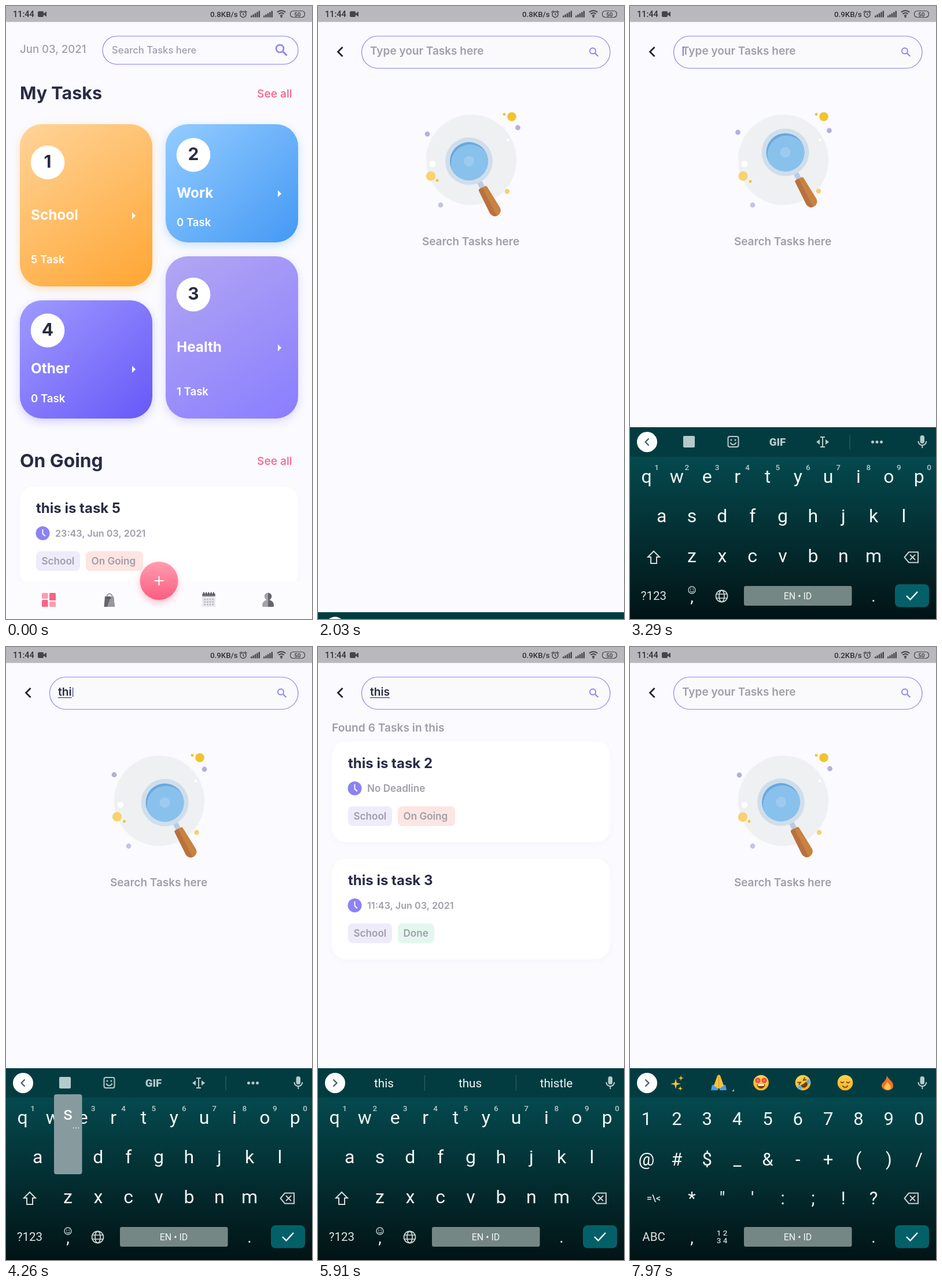
Animation, 529 px wide and 1058 px high, one loop 8000 ms. Source, as an HTML page with a canvas:

```html
<!DOCTYPE html>
<html lang="en">
<head>
<meta charset="utf-8">
<title>Task search</title>
<style>
html, body { margin: 0; width: 100%; height: 100%; overflow: hidden; background: #fafaff; }
canvas { display: block; width: 529px; height: 1058px; }
</style>
</head>
<body>
<canvas id="stage"></canvas>
<script>
const W = 529, H = 1058, LOOP = 8000;
const BG = '#fafaff', INK = '#292b45', GREY = '#9f9eaa', PINK = '#fa6385', VIOLET = '#8c82f5';
const dpr = window.devicePixelRatio || 1;

function context(canvas) {
  canvas.width = W * dpr;
  canvas.height = H * dpr;
  const ctx = canvas.getContext('2d');
  ctx.scale(dpr, dpr);
  return ctx;
}
const stage = context(document.getElementById('stage'));
const layer = context(document.createElement('canvas'));
let c = stage; // current drawing surface

const clamp = v => Math.max(0, Math.min(1, v));
const lerp = (a, b, p) => a + (b - a) * p;
const phase = (t, start, len) => clamp((t - start) / len);

function bezier(x1, y1, x2, y2) {
  const at = (a, b, u) => 3 * a * u * (1 - u) ** 2 + 3 * b * u * u * (1 - u) + u ** 3;
  return x => {
    if (x <= 0 || x >= 1) return clamp(x);
    let lo = 0, hi = 1;
    for (let i = 0; i < 24; i++) {
      const m = (lo + hi) / 2;
      if (at(x1, x2, m) < x) lo = m; else hi = m;
    }
    return at(y1, y2, (lo + hi) / 2);
  };
}
const easeSlide = bezier(.4, 0, .2, 1), easeIn = bezier(.42, 0, 1, 1), easeOut = bezier(0, 0, .58, 1);

function text(s, x, y, size, color, weight = 600, align = 'left', family = 'Inter') {
  c.font = `${weight} ${size}px ${family}, sans-serif`;
  c.textAlign = align;
  c.fillStyle = color;
  c.fillText(s, x, y);
}
const roboto = (s, x, y, size, color = '#f2f7f7', weight = 400, align = 'center') =>
  text(s, x, y, size, color, weight, align, 'Roboto');

function box(x, y, w, h, r, fill) {
  c.beginPath();
  c.roundRect(x, y, w, h, r);
  if (fill) { c.fillStyle = fill; c.fill(); }
}
function disc(x, y, r, fill) {
  c.beginPath();
  c.arc(x, y, r, 0, 7);
  c.fillStyle = fill;
  c.fill();
}
function ring(x, y, r, color, width, from = 0, to = Math.PI * 2) {
  c.beginPath();
  c.arc(x, y, r, from, to);
  c.strokeStyle = color;
  c.lineWidth = width;
  c.stroke();
}
function trace(pts) {
  c.beginPath();
  for (let i = 0; i < pts.length; i += 2) c.lineTo(pts[i], pts[i + 1]);
}
function line(color, width, ...pts) {
  trace(pts);
  c.strokeStyle = color;
  c.lineWidth = width;
  c.stroke();
}
function poly(fill, ...pts) {
  trace(pts);
  c.closePath();
  c.fillStyle = fill;
  c.fill();
}
function gradient(x0, y0, x1, y1, a, b) {
  const g = c.createLinearGradient(x0, y0, x1, y1);
  g.addColorStop(0, a);
  g.addColorStop(1, b);
  return g;
}
function shadow(color, blur, dy) {
  c.shadowColor = color;
  c.shadowBlur = blur * dpr;
  c.shadowOffsetY = dy * dpr;
}
const noShadow = () => shadow('transparent', 0, 0);

// ---------- status bar ----------
function statusBar(t) {
  const ink = '#45444a';
  box(0, 0, W, 27.5, 0, '#b9b8bd');
  roboto('11:44', 12, 19, 14.5, '#303036', 500, 'left');
  box(55, 9, 10, 10, 2, ink);
  poly(ink, 65, 13, 70, 9.5, 70, 18.5, 65, 15);
  const rate = t < 2590 ? '0.8' : t < 6860 ? '0.9' : '0.2';
  roboto(rate + 'KB/s', 353, 19, 13.3, '#303036', 500, 'left');
  ring(410, 14.5, 5, ink, 1.4);
  line(ink, 1.3, 410, 11.5, 410, 15, 412, 16);
  line(ink, 1.5, 403.5, 11, 407, 8);
  line(ink, 1.5, 413, 8, 416.5, 11);
  for (const x of [423, 445])
    for (let i = 0; i < 5; i++) box(x + i * 3.4, 16.5 - i * 2, 2.4, 3 + i * 2, 0, ink);
  for (const r of [4, 8, 12]) ring(476, 19, r - 1, ink, 1.8, -2.3, -.84);
  disc(476, 18.5, 1.6, ink);
  box(491.5, 8.5, 25, 11, 5);
  c.strokeStyle = ink;
  c.lineWidth = 1.2;
  c.stroke();
  roboto('50', 504, 17.8, 9.5, '#303036', 500);
}

// ---------- home page ----------
function tile(x, y, h, a, b, n, name, count, cy, nameY, countY) {
  shadow(b + '48', 15, 5);
  box(x, y, 229, h, 38, gradient(x + 20, y, x + 209, y + h, a, b));
  noShadow();
  disc(x + 48, cy, 29.3, '#fff');
  text(n, x + 48, cy + 9, 30, INK, 700, 'center');
  text(name, x + 19, nameY, 24.3, '#fff', 700);
  text(count + ' Task', x + 19, countY, 18.6, '#fff');
  poly('#fff', x + 194, nameY - 13, x + 200, nameY - 7, x + 194, nameY - 1);
}

function chip(label, x, y, w, fill) {
  box(x, y, w, 34, 8, fill);
  text(label, x + 9.5, y + 23, 17.1, GREY);
}

function taskCard(y, title, due, done) {
  shadow('rgba(150,150,200,.06)', 10, 3);
  box(24, y, 481, 174, 24, '#fff');
  noShadow();
  text(title, 52, y + 46, 24, INK, 700);
  disc(63.5, y + 81, 12, VIOLET);
  line('#fff', 1.8, 63.5, y + 74, 63.5, y + 82, 68, y + 86);
  text(due, 85, y + 87, due[0] === 'N' ? 17.1 : 16.2, GREY);
  chip('School', 52, y + 112, 76, '#eeebfb');
  if (done) chip('Done', 138, y + 112, 63, '#e4f7ef');
  else chip('On Going', 138, y + 112, 99, '#fde5e2');
}

function navBar() {
  box(0, 992, W, 66, 0, '#fcfcff');
  box(62, 1013, 10.5, 10, 1.5, '#fc9cb0');
  box(62, 1025, 10.5, 12, 1.5, PINK);
  box(75, 1013, 11, 13, 1.5, PINK);
  box(75, 1028, 11, 9, 1.5, '#fc9cb0');
  ring(179, 1019, 4.5, '#77777d', 1.5, Math.PI, 0);
  poly('#65656b', 171, 1019, 186, 1019, 188, 1037, 169.5, 1037);
  poly('#98989e', 181, 1019, 186, 1019, 188, 1037, 175, 1037);
  line('#44444a', 1.2, 174, 1022, 182, 1022);
  box(339, 1014, 23, 23, 2, '#e8e8ec');
  box(339, 1014, 23, 5, 2, '#77777d');
  for (let i = 0; i < 5; i++) box(341 + i * 4.2, 1011.5, 2, 5, 1, '#4b4b51');
  for (let i = 0; i < 12; i++)
    box(342.5 + i % 4 * 4.6, 1023 + Math.floor(i / 4) * 4.4, 2.6, 2.4, 0, '#b5b5bb');
  for (const [side, fill] of [[0, '#a3a3a9'], [1, '#65656b']]) {
    c.save();
    c.beginPath();
    c.rect(side ? 453 : 440, 1010, 13, 30);
    c.clip();
    box(443, 1025, 20, 12, [9, 9, 2, 2], fill);
    disc(453, 1019, 6.3, fill);
    c.restore();
  }
  shadow('rgba(252,98,130,.4)', 12, 5);
  disc(264.5, 992, 33, gradient(264, 962, 264, 1025, '#ff9bae', '#fb5c80'));
  noShadow();
  line('#fff', 2, 256.5, 992, 272.5, 992);
  line('#fff', 2, 264.5, 984, 264.5, 1000);
}

function home() {
  text('Jun 03, 2021', 24, 81, 18.6, GREY, 500);
  text('My Tasks', 24, 161, 30.5, INK, 700);
  text('See all', 434, 158, 19.2, PINK, 500);
  tile(24, 204, 280, '#ffd295', '#ffa736', '1', 'School', 5, 270, 369, 444);
  tile(276, 204, 204, '#91caff', '#479bf5', '2', 'Work', 0, 257, 331, 380);
  tile(276, 432, 280, '#b1a5f3', '#8b7fff', '3', 'Health', 1, 498, 597, 672);
  tile(24, 508, 204, '#9d97ff', '#695bf8', '4', 'Other', 0, 560, 634, 684);
  text('On Going', 24, 796, 31.8, INK, 700);
  text('See all', 434, 792, 19.2, PINK, 500);
  taskCard(829, 'this is task 5', '23:43, Jun 03, 2021');
  navBar();
}

// ---------- search field ----------
function searchField(p, t, typed) {
  const x = lerp(167, 75.5, p), h = lerp(48.5, 55.5, p);
  box(x, 52, 505 - x, h, h / 2, p ? '#fafafc' : BG);
  c.strokeStyle = VIOLET;
  c.lineWidth = 1.2;
  c.stroke();
  const mx = lerp(473.5, 475, p), my = lerp(73.5, 77.5, p), r = lerp(6.5, 5, p);
  ring(mx, my, r, VIOLET, lerp(2.6, 1.9, p));
  line(VIOLET, lerp(3, 2.2, p), mx + r * .7, my + r * .7, mx + r * 1.85, my + r * 1.85);
  if (!p) return text('Search Tasks here', 183, 82, 16.6, GREY, 500);

  const tx = x + 14.5;
  if (typed.s) {
    text(typed.s, tx, 84, 19.2, INK);
    const w = c.measureText(typed.s).width;
    line(INK, 1, tx, 87.5, tx + w, 87.5);
    drawCaret(t, tx + w + 1, typed.at);
  } else {
    text('Type your Tasks here', tx, 84, 19, p < 1 ? '#8b8992' : GREY);
    drawCaret(t, tx + .8, typed.at);
  }
}
function drawCaret(t, x, since) {
  if (t >= 2100 && Math.floor((t - since) / 500) % 2 === 0) box(x, 70, 2, 16, 0, '#7d78c4');
}

// ---------- magnifier scene ----------
const KEYS = [0, 70, 1330, 2300];
function along(vals, s) {
  for (let i = 1; i < 4; i++)
    if (s < KEYS[i]) return lerp(vals[i - 1], vals[i], (s - KEYS[i - 1]) / (KEYS[i] - KEYS[i - 1]));
  return vals[3];
}
const DOTS = [
  [[188, 189, 186.5, 187], [221, 221, 218, 220.5], 4.4, '#b3b0da'],
  [[345.5, 345.5, 344.5, 343], [210, 210, 215, 211], 4.4, '#b3b0da'],
  [[194, 195, 195.5, 192], [293.5, 293.5, 293.5, 293], 8.2, '#f7d370'],
  [[205.5, 206, 208, 204.5], [301, 301, 303, 301], 2.4, '#efc231'],
  [[328, 327, 326, 329.5], [320, 320, 319.5, 320], 4.2, '#f6cf70']
];

function handle() {
  box(38, -4.5, 16, 9, 0, '#bccbe4');
  c.beginPath();
  c.moveTo(54, -8);
  c.lineTo(96, -11.5);
  c.arc(96, -1.5, 10, -Math.PI / 2, Math.PI / 2);
  c.lineTo(54, 8);
  c.quadraticCurveTo(51, 8, 51, 5);
  c.lineTo(51, -5);
  c.quadraticCurveTo(51, -8, 54, -8);
  c.fillStyle = '#c9823f';
  c.fill();
  c.clip();
  box(50, 0, 60, 12, 0, '#b8713f');
}

function scene(s) {
  disc(265, 265.5, 78, '#eff0f2');
  disc(335, 191, 7.8, '#efc430');
  disc(322, 187, 2.4, '#efc430');
  disc(328, 231.5, 2.4, '#fff');
  disc(198, 272.5, 5.5, '#fff');
  disc(212, 343.5, 4.4, '#c3c4e5');
  for (const [xs, ys, r, fill] of DOTS) disc(along(xs, s), along(ys, s), r, fill);

  const a = (133 + .0876 * s + 1.335e-5 * s * s) * Math.PI / 180;
  c.save();
  c.translate(268 + 9.3 * Math.cos(a), 261.8 + 9.3 * Math.sin(a));
  c.save();
  c.rotate(63 * Math.PI / 180);
  handle();
  c.restore();
  disc(0, 0, 41, '#cfdeeb');
  disc(0, 0, 33, '#68a8de');
  c.clip();
  disc(2, 4, 33, '#89c1ed');
  disc(0, 0, 9, '#9dcbf0');
  c.restore();
  text('Search Tasks here', 264, 412.5, 18.9, GREY, 600, 'center');
}

const FOUND = [
  ['this is task 2', 'No Deadline'],
  ['this is task 3', '11:43, Jun 03, 2021', true],
  ['this is task 4', 'No Deadline']
];
function results(t, word) {
  text('Found 6 Tasks in ' + word, 24, 146, 19.2, GREY);
  FOUND.forEach((item, i) => {
    const p = easeOut(phase(t, 5250 + i * 350, 260));
    if (!p) return;
    c.globalAlpha = p;
    taskCard(163 + i * 202 - 17 * (1 - p), ...item);
    c.globalAlpha = 1;
  });
}

// ---------- keyboard ----------
const keyX = i => 28.5 + i * 52.35;
const ROWS = [['qwertyuiop', 0, 814], ['asdfghjkl', .5, 882], ['zxcvbnm', 1.5, 951]];
const SYMBOLS = [['1234567890', 0, 825], ['@#$_&-+()/', 0, 895], ['*"\':;!?', 1.5, 962]];
const PRESSES = [['t', 3430, 3530], ['h', 3720, 3820], ['i', 4000, 4100], ['s', 4220, 4330]];
const DELETES = [6910, 7040, 7170, 7310];

function typedAt(t) {
  let s = '', at = 2100;
  for (const [key, , up] of PRESSES) if (t >= up) { s += key; at = up; }
  for (const d of DELETES) if (t >= d) { s = s.slice(0, -1); at = d; }
  return { s, at };
}

function chevron(open) {
  disc(29.5, 752.5, 17.5, '#fff');
  const d = open ? 3 : -3;
  line('#3b5557', 2, 29.5 - d, 746.5, 29.5 + d, 752.5, 29.5 - d, 758.5);
}

function toolbar() {
  const ink = '#b5cacb';
  box(92, 742, 20, 20, 2, ink);
  box(169.5, 743, 18, 18, 3);
  c.strokeStyle = ink;
  c.lineWidth = 2;
  c.stroke();
  disc(175, 749, 1.5, ink);
  disc(182, 749, 1.5, ink);
  ring(178.5, 752, 5, ink, 2, .2, 2.9);
  roboto('GIF', 255, 759, 18.5, ink, 900);
  line(ink, 2, 333, 744, 333, 761);
  line(ink, 2, 329, 744, 337, 744);
  line(ink, 2, 329, 761, 337, 761);
  poly(ink, 322, 752.5, 328, 748, 328, 757);
  poly(ink, 344, 752.5, 338, 748, 338, 757);
  line('#2c6064', 1.2, 380, 740, 380, 765);
  for (const x of [419.5, 427, 434.5]) disc(x, 752.5, 2.5, ink);
}

function sparkle(x, y, r) {
  const pts = [];
  for (let i = 0; i < 8; i++) {
    const q = i % 2 ? r * .28 : r, a = i * Math.PI / 4;
    pts.push(x + q * Math.cos(a), y + q * Math.sin(a));
  }
  poly('#fcc63b', ...pts);
}
function flame(x, y, k, fill) {
  c.beginPath();
  c.moveTo(x - k * .1, y - k * 1.25);
  c.bezierCurveTo(x + k * .3, y - k * .5, x + k, y - k * .4, x + k * .85, y + k * .5);
  c.bezierCurveTo(x + k * .6, y + k * 1.15, x - k * .6, y + k * 1.15, x - k * .85, y + k * .4);
  c.bezierCurveTo(x - k * .95, y - k * .3, x - k * .1, y - k * .3, x - k * .1, y - k * 1.25);
  c.fillStyle = fill;
  c.fill();
}
function face(x, y) {
  disc(x, y, 13.3, gradient(x, y - 13, x, y + 13, '#ffd44a', '#fbb02c'));
}
function emojis() {
  const y = 752, brown = '#6b4014';
  sparkle(79, 754, 9);
  sparkle(88, 744, 5);
  sparkle(87, 762, 4.5);
  poly('#4a9ee8', 140, 765, 142, 756, 152, 755, 152, 765);
  poly('#4a9ee8', 167, 765, 165, 756, 155, 755, 155, 765);
  poly('#fcc23a', 151, 740, 153.5, 738, 156, 740, 162, 757, 155, 762, 152, 762, 145, 757);
  line('#d99723', 1.2, 153.5, 741, 153.5, 761);
  poly('#9db5b7', 180, 763, 180, 767, 176, 767);
  face(226.5, y);
  for (const x of [221, 232]) {
    disc(x, 748, 4.6, '#e84a4a');
    disc(x, 748, 2, '#f47a6a');
  }
  c.beginPath();
  c.arc(226.5, 755, 7, 0, Math.PI);
  c.fillStyle = brown;
  c.fill();
  box(221, 755, 11, 2.5, 1, '#fff');
  c.save();
  c.translate(299, y);
  c.rotate(-.6);
  face(0, 0);
  line(brown, 1.8, -8, -6, -3, -3, -8, -1);
  line(brown, 1.8, 8, -6, 3, -3, 8, -1);
  c.beginPath();
  c.arc(0, 2, 7, 0, Math.PI);
  c.fillStyle = brown;
  c.fill();
  disc(-9, 4, 3.5, '#55b4f0');
  disc(9, 4, 3.5, '#55b4f0');
  c.restore();
  face(372, y);
  ring(367, 749, 3, brown, 1.6, .3, 2.8);
  ring(377, 749, 3, brown, 1.6, .3, 2.8);
  ring(372, 755, 5, brown, 1.7, .4, 2.7);
  flame(445, 754, 11.5, '#f4722b');
  flame(445, 758, 6.5, '#fdc746');
}

function letterKeys() {
  for (const [keys, shift, y] of ROWS)
    [...keys].forEach((k, i) => roboto(k, keyX(i + shift), y + 9, 32));
  [...'1234567890'].forEach((n, i) => roboto(n, keyX(i) + 17.5, 800.5, 13.5, '#b7c9ca', 500));
  line('#d3dddd', 2, 41, 941, 51, 951, 46, 951, 46, 962, 36, 962, 36, 951, 31, 951, 41, 941, 51, 951);
  roboto('?123', 41, 1025, 20.5, '#dce5e5');
  ring(107, 1008, 6, '#c5d2d3', 1.4);
  disc(104.8, 1006.5, 1, '#c5d2d3');
  disc(109.2, 1006.5, 1, '#c5d2d3');
  ring(107, 1008.5, 3, '#c5d2d3', 1.2, .2, 2.9);
  ring(158.5, 1018.5, 10, '#c5d2d3', 1.8);
  c.beginPath();
  c.ellipse(158.5, 1018.5, 4.5, 10, 0, 0, 7);
  c.stroke();
  line('#c5d2d3', 1.6, 149.5, 1015, 167.5, 1015);
  line('#c5d2d3', 1.6, 149.5, 1022, 167.5, 1022);
}
function symbolKeys() {
  for (const [keys, shift, y] of SYMBOLS)
    [...keys].forEach((k, i) => roboto(k, keyX(i + shift), y, 31));
  roboto('=\\<', 41, 957, 16.5, '#d3dddd', 500);
  roboto('ABC', 41, 1025, 20.5, '#dce5e5');
  roboto('1 2', 159, 1016, 13.5, '#c5d2d3', 500);
  roboto('3 4', 159, 1029, 13.5, '#c5d2d3', 500);
}

function popup(t) {
  const press = PRESSES.find(p => t >= p[1] && t < p[2]);
  if (!press) return;
  const [keys, shift, y] = ROWS.find(r => r[0].includes(press[0]));
  const x = keyX(keys.indexOf(press[0]) + shift);
  box(x - 24, y - 110, 48.5, 138, 4, '#879b9f');
  roboto(press[0], x, y - 66, 32, '#fff');
  roboto('...', x + 14, y - 51, 16, '#fff');
}

function keyboard(t, typed) {
  const p = easeSlide(phase(t, 2000, 270));
  if (!p) return;
  c.save();
  c.translate(0, (1 - p) * 331);
  box(0, 727, W, 51, 0, '#033c40');
  box(0, 778, W, 280, 0, gradient(0, 778, 0, H, '#04494e', '#021315'));
  const symbols = t >= 7520, emptied = t >= DELETES[3];
  const words = t >= 4420 && !emptied;
  chevron(words || emptied);
  if (words) {
    ['this', 'thus', 'thistle'].forEach((s, i) => roboto(s, [114, 263, 412][i], 760, 20.7));
    for (const x of [184.5, 342.5]) line('#2c6064', 1.2, x, 739, x, 766);
  } else if (emptied) emojis();
  else toolbar();

  box(501.5, 741, 7.5, 14, 3.7, '#b5cacb');
  ring(505.3, 751, 7, '#b5cacb', 2, 0, Math.PI);
  line('#b5cacb', 2, 505.3, 758, 505.3, 763);

  if (t >= 7450 && t < 7520) box(12, 998, 58, 40, 6, 'rgba(255,255,255,.15)');
  if (DELETES.some(d => t >= d - 50 && t < d)) box(461, 931, 52, 41, 6, 'rgba(255,255,255,.15)');
  if (symbols) symbolKeys(); else letterKeys();

  line('#c5d2d3', 2, 474.5, 951.5, 482, 942.5, 498, 942.5, 498, 960.5, 482, 960.5, 474.5, 951.5, 482, 942.5);
  line('#c5d2d3', 2, 484, 947, 493, 956);
  line('#c5d2d3', 2, 493, 947, 484, 956);
  roboto(',', 107, 1029, 28);
  roboto('.', 421, 1028, 28);
  box(197, 1001, 186.5, 34, 3, '#748785');
  roboto('EN • ID', 290, 1024, 16);
  box(458, 998, 59, 39.5, 8, '#046068');
  line('#fff', 2.4, 478, 1018, 484.5, 1024.5, 497, 1011);
  popup(t);
  c.restore();
}

// ---------- composition ----------
// The page is painted on its own layer so that it fades as one sheet.
function searchPage(t, typed, slide) {
  c = layer;
  c.clearRect(0, 0, W, H);
  c.save();
  c.translate(0, (1 - slide) * 264);
  box(0, 0, W, H, 0, BG);
  line('#222226', 2.7, 42.5, 71, 34.5, 79, 42.5, 87);
  if (t < 4890) scene(Math.max(0, t - 1960));
  else if (t < 7400) results(t, typed.s);
  else scene(Math.max(0, t - 7900));
  c.restore();
  c = stage;
  c.globalAlpha = easeIn(phase(t, 1150, 300));
  c.drawImage(layer.canvas, 0, 0, W, H);
  c.globalAlpha = 1;
}

function draw(t) {
  const typed = typedAt(t), slide = easeSlide(phase(t, 1150, 300));
  noShadow();
  box(0, 0, W, H, 0, BG);
  if (t < 1450) home();
  if (t > 1150) searchPage(t, typed, slide);
  searchField(slide, t, typed);
  keyboard(t, typed);
  statusBar(t);
}

function tick(now) {
  draw(now % LOOP);
  requestAnimationFrame(tick);
}
draw(0);
requestAnimationFrame(tick);
</script>
</body>
</html>
```
